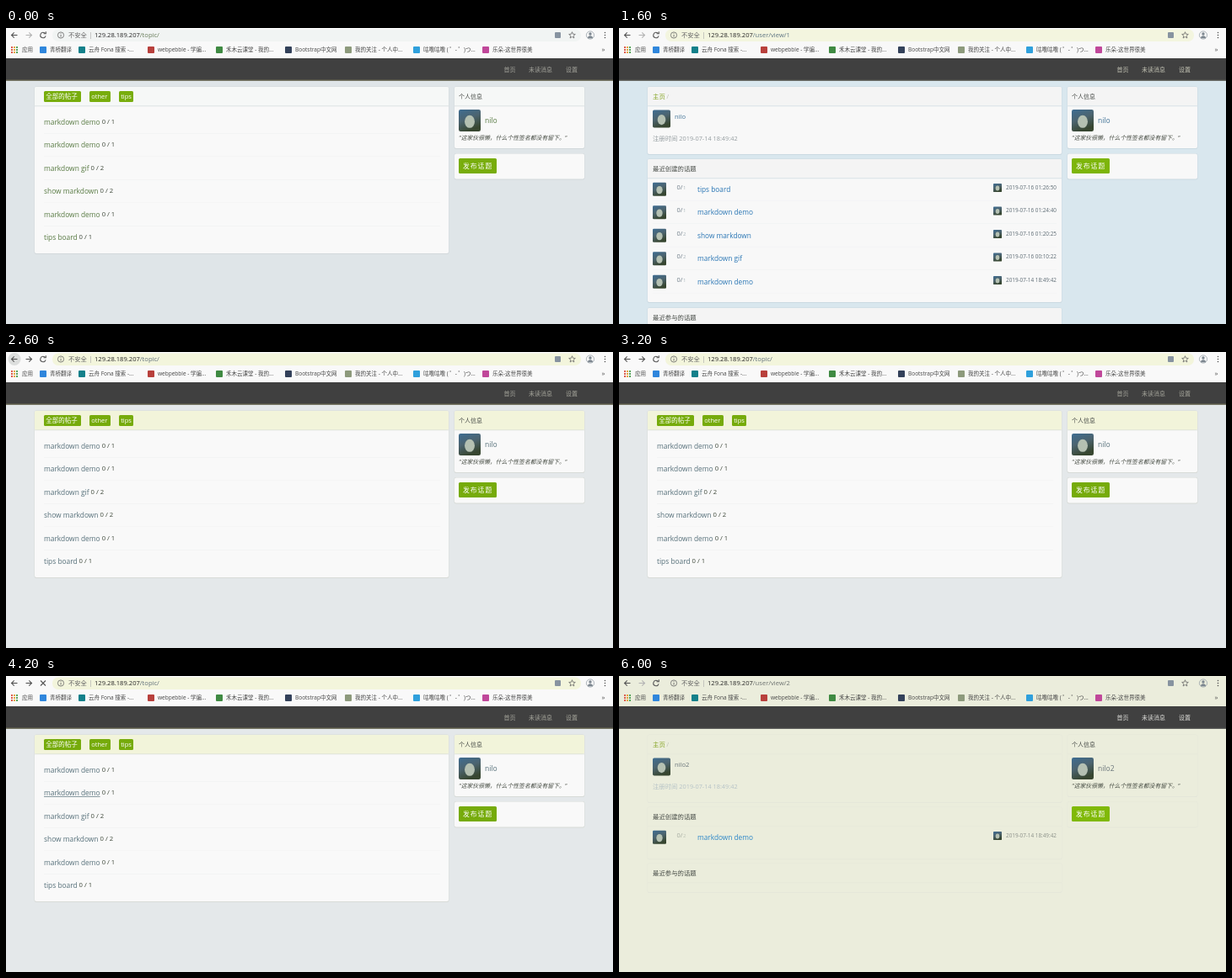
These frames come from a looping animation (720x352 px, 6.2 s). An HTML page with a canvas:

```html
<!DOCTYPE html>
<html lang="zh">
<head>
<meta charset="utf-8">
<title>Forum</title>
<style>
html, body { margin: 0; width: 100%; height: 100%; overflow: hidden; background: #fff; }
canvas { display: block; width: 720px; height: 352px; }
</style>
</head>
<body>
<canvas id="stage" width="720" height="352"></canvas>
<script>
const c = document.getElementById('stage').getContext('2d');
const SANS = '"Open Sans", "Noto Sans CJK SC", "Noto Sans CJK", "Noto Sans", sans-serif';
const MONO = '"DejaVu Sans Mono", monospace';
const LOOP = 6200;

// Colour moods of the page: each one belongs to a stretch of time.
const moods = {
  cool: { bg: '#dfe5e8', omni: '#f1f4f3', head: '#f6f8f7', panel: '#f9f9f9', edge: '#d3d9dc',
          link: '#587a43', path: '#637955', nav: '#a3a39b', rule: '#6c6b52', btn: '#78ad0c' },
  wait: { bg: '#e0e5e9', omni: '#f1f4f3', head: '#f5f7f6', panel: '#f9f9f9', edge: '#d5d9de',
          link: '#587a43', path: '#637955', nav: '#96968e', rule: '#6c6b52', btn: '#72a50e' },
  blue: { bg: '#d9e7ee', omni: '#f3f5df', head: '#f4f4f4', panel: '#f8f8f8', edge: '#cbdae2',
          link: '#3f7196', path: '#5d7482', nav: '#c3c3b4', rule: '#5a5a52', btn: '#7db50a' },
  lime: { bg: '#e4e8ea', omni: '#f3f5dc', head: '#f2f4da', panel: '#f9f9f9', edge: '#d8dbd8',
          link: '#56707a', path: '#5d6d78', nav: '#a5a59b', rule: '#6c6b52', btn: '#76ab0b' },
  pale: { bg: '#dceaee', omni: '#dfeaec', head: '#f8f8f8', panel: '#f8f8f8', edge: '#d9e6ea',
          link: '#3a4a55', path: '#6d7678', nav: '#c3c3b4', rule: '#5a5a52', btn: '#7db50a' },
  sand: { bg: '#ebeddc', omni: '#ebeddc', head: '#ebeddc', panel: '#ebeddc', edge: '#e5e7da',
          link: '#69747a', path: '#6d7270', nav: '#dededa', rule: '#4c4c4c', btn: '#80b908' }
};

const phases = [
  { at: 0, view: 'list', id: 1, mood: 'cool' },
  { at: 800, view: 'list', id: 1, mood: 'wait', load: true },
  { at: 1400, view: 'user', id: 1, mood: 'blue' },
  { at: 2400, view: 'list', id: 1, mood: 'lime', back: true, next: true },
  { at: 3200, view: 'list', id: 1, mood: 'lime', next: true },
  { at: 3600, view: 'list', id: 1, mood: 'lime', next: true, hover: 1 },
  { at: 3800, view: 'list', id: 1, mood: 'lime', next: true, hover: 1, load: true },
  { at: 4400, view: 'post', mood: 'pale' },
  { at: 5200, view: 'post', mood: 'pale', load: true },
  { at: 5600, view: 'user', id: 2, mood: 'sand' }
];

const users = { 1: 'nilo', 2: 'nilo2' };
const topics = [['markdown demo', 1], ['markdown demo', 1], ['markdown gif', 2],
  ['show markdown', 2], ['markdown demo', 1], ['tips board', 1]];
const created = {
  1: [['tips board', 1, '2019-07-16 01:26:50'], ['markdown demo', 1, '2019-07-16 01:24:40'],
    ['show markdown', 2, '2019-07-16 01:20:25'], ['markdown gif', 2, '2019-07-16 00:10:22'],
    ['markdown demo', 1, '2019-07-14 18:49:42']],
  2: [['markdown demo', 2, '2019-07-14 18:49:42']]
};
const marks = [
  [40, '#2f86dc', '青桥翻译'], [86, '#14808a', '云舟 Fona 搜索 -...'], [168, '#b8403c', 'webpebble - 学编...'],
  [249, '#3f8a42', '禾木云课堂 - 我的...'], [331, '#33415a', 'Bootstrap中文网'], [402, '#8d9a7c', '我的关注 - 个人中...'],
  [483, '#2fa0dc', '咕噜咕噜 ( ゜- ゜)つ...'], [565, '#c0479a', '乐朵-这世界很美']];

let m;

function box(x, y, w, h, color) {
  c.fillStyle = color;
  c.fillRect(x, y, w, h);
}

function round(x, y, w, h, r, color) {
  c.fillStyle = color;
  c.beginPath();
  c.roundRect(x, y, w, h, r);
  c.fill();
}

function dot(x, y, r, color) {
  c.fillStyle = color;
  c.beginPath();
  c.arc(x, y, r, 0, 7);
  c.fill();
}

function ring(x, y, r, color, from = 0, to = 7) {
  c.strokeStyle = color;
  c.beginPath();
  c.arc(x, y, r, from, to);
  c.stroke();
}

function line(color, ...p) {
  c.strokeStyle = color;
  c.beginPath();
  for (let i = 0; i < p.length; i += 2) c.lineTo(p[i], p[i + 1]);
  c.stroke();
}

// Draws text centred on y and returns its right end.
function text(s, x, y, size, color, style = '', family = SANS) {
  c.font = `${style} ${size}px ${family}`;
  c.fillStyle = color;
  c.fillText(s, x, y + size * 0.37);
  return x + c.measureText(s).width;
}

function panel(x, y, w, h, head) {
  round(x - 0.5, y - 0.5, w + 1, h + 1.5, 2, m.edge);
  round(x, y, w, h, 2, m.panel);
  if (head) {
    round(x, y, w, 23, 2, m.head);
    box(x, y + 22.5, w, 0.7, m.edge);
  }
}

function avatar(x, y, s) {
  const g = c.createLinearGradient(x, y, x + s * 0.4, y + s);
  g.addColorStop(0, '#3d6c91');
  g.addColorStop(0.5, '#4c6470');
  g.addColorStop(1, '#374630');
  round(x, y, s, s, s / 12, g);
  c.fillStyle = '#b4c0b2';
  c.beginPath();
  c.ellipse(x + s * 0.5, y + s * 0.55, s * 0.23, s * 0.29, 0, 0, 7);
  c.fill();
}

function arrow(x, dir, color) {
  line(color, x - 3.5, 8.5, x + 3.5, 8.5);
  line(color, x + dir * 0.3, 5.3, x + dir * 3.5, 8.5, x + dir * 0.3, 11.7);
}

function star(x, y, r) {
  const p = [];
  for (let i = 0; i <= 10; i++) {
    const a = i * Math.PI / 5 - Math.PI / 2, k = i % 2 ? r * 0.45 : r;
    p.push(x + Math.cos(a) * k, y + Math.sin(a) * k);
  }
  line('#666', ...p);
}

function browser(p) {
  box(0, 0, 720, 36, m.panel);
  c.lineWidth = 1.1;
  if (p.back) dot(10, 8.5, 7.5, '#dcdedd');
  arrow(10, -1, '#555');
  arrow(27, 1, p.next ? '#555' : '#b4b4b4');
  if (p.load) {
    line('#555', 41, 5.5, 47, 11.5);
    line('#555', 47, 5.5, 41, 11.5);
  } else {
    ring(44, 8.5, 3.2, '#555', 0.3, 5.5);
    line('#555', 44.6, 6.8, 47.3, 6.8, 47.3, 4.2);
  }
  round(55, 1.5, 627, 14.5, 7, m.omni);
  c.lineWidth = 0.8;
  ring(65, 8.5, 3.6, '#666');
  box(64.6, 8, 0.9, 2.6, '#666');
  box(64.6, 6.3, 0.9, 0.9, '#666');
  text('不安全', 74, 8.5, 7.3, '#666');
  box(100, 5, 0.6, 8, '#aaa');
  const path = p.view === 'list' ? '/topic/' : p.view === 'post' ? '/topic/2' : '/user/view/' + p.id;
  text(path, text('129.28.189.207', 105, 8.5, 7.6, '#262626'), 8.5, 7.6, m.path);
  round(651, 5, 7, 7, 1, '#8793a0');
  star(671.5, 8.7, 4);
  ring(693, 8.5, 4.6, '#98a1a9');
  dot(693, 7, 1.7, '#7d8790');
  c.fillStyle = '#7d8790';
  c.beginPath();
  c.arc(693, 12.3, 3, Math.PI, 0);
  c.fill();
  for (let i = 0; i < 3; i++) dot(710.5, 5.5 + i * 3, 0.8, '#555');

  const hues = ['#dc5a4c', '#e3a53b', '#55a45c', '#4f86d9'];
  for (let i = 0; i < 9; i++) box(6 + i % 3 * 3, 22 + Math.floor(i / 3) * 3, 2, 2, hues[(i + Math.floor(i / 3)) % 4]);
  text('应用', 19, 26, 6.5, '#444');
  for (const [x, color, name] of marks) {
    round(x, 22, 8, 8, 1, color);
    text(name, x + 12, 26, 6.5, '#444');
  }
  text('»', 706.5, 25.5, 8, '#555');
}

function button(s, x, y, w, h, size) {
  round(x, y, w, h, 1.5, m.btn);
  text(s, x + 2.2, y + h / 2, size, '#fff');
}

function frame(p) {
  box(0, 36, 720, 26.5, '#404040');
  box(0, 61.5, 720, 1.2, m.rule);
  text('首页', 590.5, 49.5, 7, m.nav);
  text('未读消息', 620, 49.5, 7, m.nav);
  text('设置', 664, 49.5, 7, m.nav);

  panel(532, 70, 154, 73, true);
  text('个人信息', 537, 81.5, 7, '#484c48');
  avatar(537, 97, 26);
  text(users[p.id], 568, 110, 8.5, m.link);
  text('"这家伙很懒，什么个性签名都没有留下。"', 537, 130, 6.85, '#42483f', 'italic');
  panel(532, 149.5, 154, 30);
  round(537, 155, 45, 18, 1.5, m.btn);
  c.letterSpacing = '1px';
  text('发布话题', 542, 164, 7.8, '#fff', '500');
  c.letterSpacing = '0px';
}

function list(p) {
  frame(p);
  panel(34, 70, 491, 198, true);
  button('全部的帖子', 45, 75, 44, 13, 7.5);
  button('other', 99, 75, 25, 13, 7.5);
  button('tips', 134, 75, 17, 13, 7.5);
  topics.forEach(([name, n], i) => {
    const y = 111.5 + i * 27.5;
    const end = text(name, 45, y, 8.4, m.link);
    text('0 / ' + n, end + 2, y - 0.5, 7.7, '#3c4638');
    if (p.hover === i) box(45, y + 4.2, end - 45, 0.7, m.link);
    if (i < 5) box(45, y + 13.5, 470, 0.6, '#f1f2f2');
  });
}

function user(p) {
  const first = p.id === 1;
  frame(p);
  panel(34, 70, 491, 80, true);
  text(' /', text('主页', 40, 81.5, 7.4, '#86a526'), 81.5, 7, '#b9bdb0');
  avatar(40, 97.5, 21);
  text(users[p.id], 66, 105, 7.6, m.link);
  text('注册时间 2019-07-14 18:49:42', 40, 131, 7.35, first ? '#959da0' : '#b5c2c6');

  panel(34, 156, 491, first ? 170 : 61.5, true);
  text('最近创建的话题', 40, 167.5, 7.4, '#454a45');
  created[p.id].forEach(([title, n, date], i) => {
    const y = 191.5 + i * 27.5;
    avatar(40, y - 7.7, 16);
    const end = text('0/', 68.5, y - 2.5, 7.4, first ? '#6c7a86' : '#a3a99f');
    text(n, end + 0.5, y - 2, 6, first ? '#a3b0b6' : '#bcc2b4');
    text(title, 93, y, 8.3, first ? '#2a76b4' : '#2b86c8');
    avatar(444, y - 6.5, 10);
    text(date, 459, y - 2, 6.35, first ? '#5d6b74' : '#8a8f88');
    if (first) box(40, y + 13.3, 479, 0.6, '#eff1f2');
  });

  panel(34, first ? 333 : 223, 491, 34, true);
  text('最近参与的话题', 40, first ? 344 : 234.5, 7.4, '#454a45');
}

function post() {
  const ink = '#33383a', soft = '#747c80', bar = '#dcebee', meta = '#7f8587';
  panel(34, 43, 482, 320);
  text('markdown demo', 40, 61, 11.6, '#2d3132', 'bold');
  const x = text('• 发布于 2019-07-14 18:49:42 • 作者 ', 40, 78.5, 6.45, meta);
  const end = text(users[2], x, 78.5, 6.45, '#4d5a62');
  box(x, 82, end - x, 0.7, '#4d5a62');
  text(' • 2 次浏览 • 来自 问答', end, 78.5, 6.45, meta);
  box(34, 89.5, 482, 0.8, '#dfe4e5');

  text('示例', 45, 106, 17.2, '#2a2e30', 'bold');
  box(45, 116, 451, 0.8, '#d2e0e4');
  text('标题', 45, 144.5, 17.2, '#2a2e30', 'bold');
  text('粗体', 45, 170, 7.6, ink, 'bold');
  dot(52, 192, 1.4, ink);
  text('缩进', 58, 192, 7.5, ink);
  c.lineWidth = 0.7;
  ring(64, 207.5, 1.4, ink);
  text('缩进', 71, 207, 7.5, ink);
  text('行内高亮：', 45, 229.5, 7.5, ink);
  round(86, 224, 34, 12, 1, '#e2edef');
  text('markdown', 89, 230, 5.85, '#c4325c', '', MONO);
  text('按键：CTRL', 45, 252, 7.6, ink);

  box(44.5, 267, 2.5, 35, bar);
  text('多层引用', 55.5, 273, 8.1, soft);
  box(55, 288, 2.5, 14, bar);
  text('多层引用', 66, 295, 8.1, soft);
  box(45, 319, 29, 0.9, '#4b6272');
  box(44.5, 334, 2.5, 18, bar);
  text('单层引用', 55.5, 341, 8.1, soft);
  text('单层引用', 55.5, 353, 8.1, soft);

  box(714, 36, 6, 316, m.bg);
  c.fillStyle = '#8a8f92';
  c.beginPath();
  c.moveTo(715.3, 41.5);
  c.lineTo(717, 39.5);
  c.lineTo(718.7, 41.5);
  c.fill();
  box(714, 45, 6, 175, '#c6c2c5');
}

const views = { list, user, post };

function draw() {
  const t = performance.now() % LOOP;
  const p = phases.filter(s => s.at <= t).pop();
  m = moods[p.mood];
  box(0, 0, 720, 352, m.bg);
  views[p.view](p);
  browser(p);
  requestAnimationFrame(draw);
}
draw();
</script>
</body>
</html>
```
